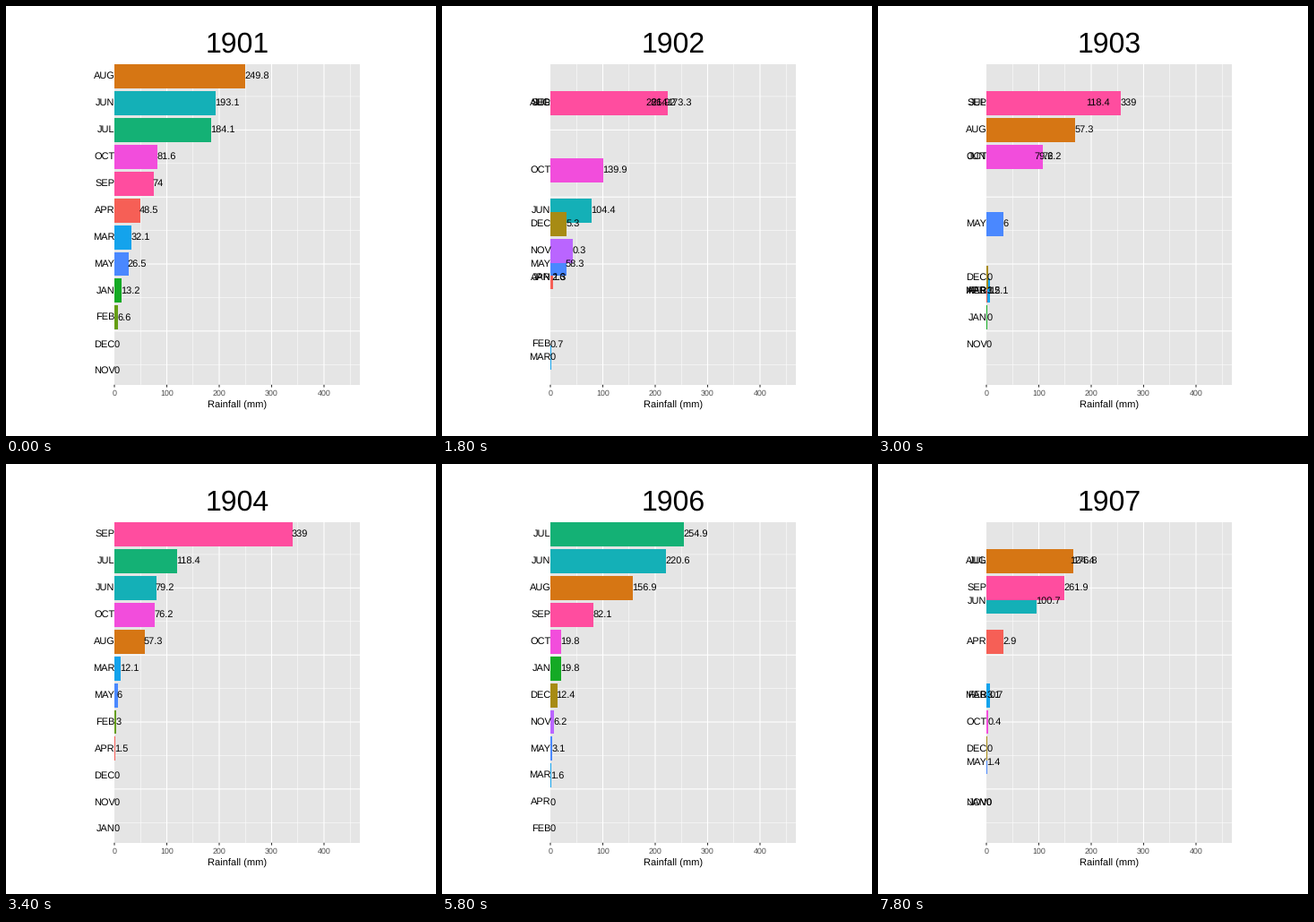
These frames come from a looping animation (480 px wide and 480 px high, 8000 ms). A matplotlib script:

```python
import numpy as np
import matplotlib.pyplot as plt
from matplotlib.animation import FuncAnimation
from matplotlib.patches import Rectangle

plt.rcParams["font.family"] = "Liberation Sans"
plt.rcParams["text.hinting"] = "none"

SIZE, DPI = 480, 100
PT = 72 / DPI                      # points per pixel
X0, X1, Y0, Y1 = 121, 395, 64.7, 422.8
PER_MM = 0.585
ROW = 29.93
BAR_H = 0.9 * ROW
HOLD, STEPS = 3, 4                 # still frames, then steps to the next year
CYCLE = HOLD + STEPS - 1

MONTHS = "JAN FEB MAR APR MAY JUN JUL AUG SEP OCT NOV DEC".split()
FIRST_YEAR = 1901
# Wet months in falling order and the leading amounts; the rest fade by halves.
YEARS = [
    ("AUG JUN JUL OCT SEP APR MAR MAY JAN FEB",
     [249.8, 193.1, 184.1, 81.6, 74, 48.5, 32.1, 26.5]),
    ("SEP JUL AUG NOV OCT DEC JUN APR JAN MAY MAR",
     [273.3, 120.9, 85.2, 84.4, 61.3, 56.9, 52.4, 7.2]),
    ("AUG JUL SEP OCT JUN MAY DEC JAN APR FEB NOV",
     [281.9, 264.2, 173.3, 139.9, 104.4, 58.3, 5.3]),
    ("SEP JUL JUN OCT AUG MAR MAY FEB APR",
     [339, 118.4, 79.2, 76.2, 57.3, 12.1]),
    ("SEP AUG JUL JUN OCT APR MAY FEB JAN NOV",
     [157.8, 137.6, 94.8, 84.6, 15.4]),
    ("JUL JUN AUG SEP OCT JAN DEC NOV MAY MAR",
     [254.9, 220.6, 156.9, 82.1, 19.8, 19.8, 12.4]),
    ("JUL AUG JUN APR SEP MAR OCT DEC FEB JAN",
     [197.6, 154.8, 90.7, 61.3, 35.5, 12.8]),
    ("SEP AUG JUL JUN FEB APR MAY MAR OCT",
     [261.9, 176.8, 124.4, 100.7, 3.1, 2.9]),
]


def expand(wet, lead):
    """Amount and rank of every month; dry months come last, latest first."""
    wet = wet.split()
    order = wet + [m for m in reversed(MONTHS) if m not in wet]
    fade = [lead[-1] / 2 ** n for n in range(1, len(wet) - len(lead) + 1)]
    amounts = lead + fade + [0] * (len(order) - len(wet))
    ranks = [order.index(m) for m in MONTHS]
    return np.array([round(amounts[r], 1) for r in ranks]), np.array(ranks) + 1


DATA = [expand(*year) for year in YEARS]


def hcl_color(hue, chroma=100, lum=65, gamma=1.28):
    """Polar LUV colour as RGB, darkened a little by gamma."""
    a = np.radians(hue)
    u = chroma * np.cos(a) / (13 * lum) + 0.1978
    v = chroma * np.sin(a) / (13 * lum) + 0.4683
    y = ((lum + 16) / 116) ** 3
    x = 9 * y * u / (4 * v)
    z = 3 * y / v - x / 3 - 5 * y
    rgb = np.clip([3.2406 * x - 1.5372 * y - 0.4986 * z,
                   -0.9689 * x + 1.8758 * y + 0.0415 * z,
                   0.0557 * x - 0.2040 * y + 1.0570 * z], 0.0031, 1)
    srgb = 1.055 * rgb ** (1 / 2.4) - 0.055
    return np.clip(srgb ** gamma, 0.08, 1)


# hues run around the wheel in alphabetical order of the months
COLORS = [hcl_color(15 + 30 * sorted(MONTHS).index(m)) for m in MONTHS]


def row_y(rank):
    return 78.5 + (rank - 1) * ROW


def ease(t):
    return 4 * t ** 3 if t < 0.5 else 1 - 4 * (1 - t) ** 3


fig = plt.figure(figsize=(SIZE / DPI, SIZE / DPI), dpi=DPI, facecolor="white")
ax = fig.add_axes([0, 0, 1, 1])
ax.set_xlim(0, SIZE)
ax.set_ylim(SIZE, 0)
ax.axis("off")


def label(x, y, text, px, ha="center", color="black"):
    return ax.text(x, y, text, size=px * PT, ha=ha, va="baseline",
                   color=color, zorder=4)


def line(xs, ys, px, color="white"):
    ax.plot(xs, ys, color=color, lw=px * PT, solid_capstyle="butt",
            snap=False, zorder=1)


def draw_panel():
    ax.add_patch(Rectangle((X0, Y0), X1 - X0, Y1 - Y0, fc="#e5e5e5", lw=0, zorder=0))
    for mm in range(50, 451, 50):
        x = X0 + mm * PER_MM
        line([x, x], [Y0, Y1], 0.55 if mm % 100 else 1.1)
    for k in range(9):
        y = row_y(1.75 + 1.25 * k)
        line([X0, X1], [y, y], 1.1 if k % 2 else 0.55)
    for mm in range(0, 401, 100):
        x = X0 + mm * PER_MM
        line([x, x], [Y1, Y1 + 2.8], 1.1, "#333333")
        label(x, 435, str(mm), 8.9, color="#4d4d4d")
    label(258.2, 448.4, "Rainfall (mm)", 11.1)


draw_panel()
title = label(258.5, 52, "", 32)
bars = [ax.add_patch(Rectangle((X0, 0), 0, 0, fc=color, lw=0, zorder=2))
        for color in COLORS]
names = [label(X0 + 0.5, 0, m, 11, ha="right") for m in MONTHS]
amounts = [label(X0, 0, "", 11, ha="left") for _ in MONTHS]


def update(i):
    k, step = divmod(i + 1, CYCLE)
    t = max(0, step - HOLD + 1) / STEPS
    e = ease(t)
    title.set_text(str(FIRST_YEAR + k + (t > 0.5)))
    (mm0, rank0), (mm1, rank1) = DATA[k], DATA[k + 1]
    widths = (mm0 + (mm1 - mm0) * e) * PER_MM
    ys = row_y(rank0 + (rank1 - rank0) * e)
    shown = mm1 if t >= 0.5 else mm0
    for bar, name, amount, w, y, mm in zip(bars, names, amounts, widths, ys, shown):
        top, bottom = round(y - BAR_H / 2), round(y + BAR_H / 2)
        bar.set_bounds(X0, top, round(w + 0.25), bottom - top)
        name.set_y(y + 2.6)
        amount.set_position((X0 + w - 0.6, y + 2.6))
        amount.set_text(f"{mm:g}")
    return [title, *bars, *names, *amounts]


anim = FuncAnimation(fig, update, frames=40, interval=200, repeat=True,
                     repeat_delay=0, blit=False)
plt.show()
```
